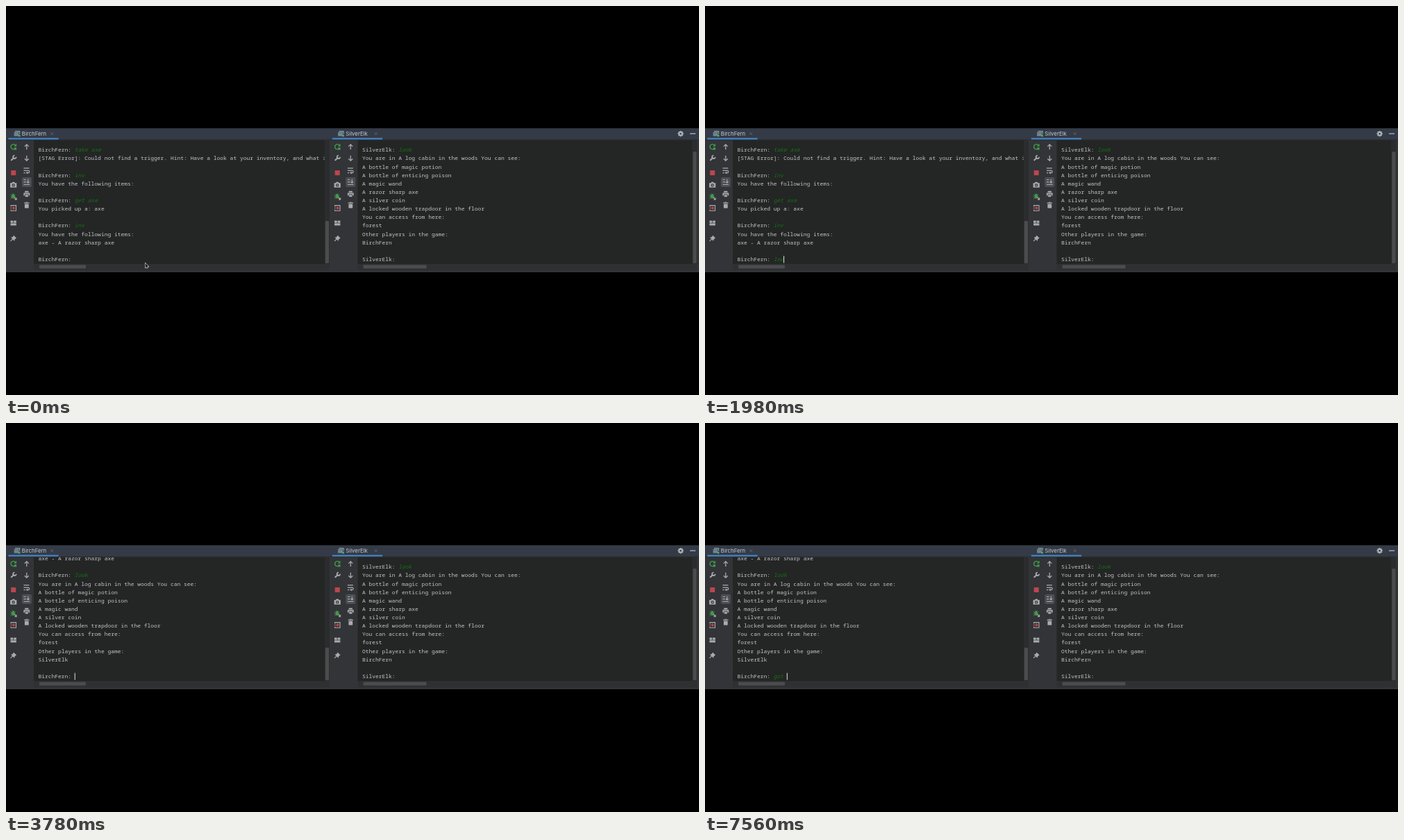
These frames come from a looping animation (998 by 561 pixels, 8 s). An HTML page with a canvas:

```html
<!DOCTYPE html>
<html lang="en">
<head>
<meta charset="utf-8">
<title>Two consoles</title>
<style>
html, body { margin: 0; width: 100%; height: 100%; overflow: hidden; background: #000; }
canvas { display: block; }
</style>
</head>
<body>
<canvas id="stage" width="998" height="561"></canvas>
<script>
const ctx = document.getElementById('stage').getContext('2d');
const LOOP = 8000;
const CHAR = 4.764, LINE = 12.13, BASE = 368, TEXT_X = 46.4, SHIFT = 466.5;
const MONO = '500 7.94px "Noto Sans Mono", "DejaVu Sans Mono", monospace';
const GREY = '#a9abad', GREEN = '#439a4c', RED = '#bd464d', INPUT = '#127412';
const HEADER = '#343b47', GUTTER = '#323437', SCREEN = '#242525';
const ONE = 'BirchFern', TWO = 'SilverElk';

// A "|" separates the prompt from what the player typed.
const room = (axe, other) => [
  'You are in A log cabin in the woods You can see:',
  'A bottle of magic potion', 'A bottle of enticing poison', 'A magic wand',
  ...(axe ? ['A razor sharp axe'] : []),
  'A silver coin', 'A locked wooden trapdoor in the floor',
  'You can access from here:', 'forest', 'Other players in the game:', other, ''
];
const history = [
  ONE + ': |take axe',
  '[STAG Error]: Could not find a trigger. Hint: Have a look at your inventory, and what items',
  '', ONE + ': |inv', 'You have the following items:',
  '', ONE + ': |get axe', 'You picked up a: axe',
  '', ONE + ': |inv', 'You have the following items:', 'axe - A razor sharp axe', ''
];
const rightLog = [TWO + ': |look', ...room(true, ONE), TWO + ': '];

const ENTER = 2800, REPLY = 3640;
const typeLook = [1460, 1680, 1940, 2520];
const typeGot = [6200, 6730, 6920, 7440];
const caretOff = [[0, 790], [1270, 1460], [4200, 4620], [5640, 6200]];

const typed = (word, times, t) => word.slice(0, times.filter(at => t >= at).length);

function leftLog(t) {
  if (t < ENTER) return [...history, ONE + ': |' + typed('look', typeLook, t)];
  const sent = [...history, ONE + ': |look'];
  if (t < REPLY) return [...sent, ''];
  return [...sent, ...room(false, TWO), ONE + ': |' + typed('got ', typeGot, t)];
}

function rect(color, x, y, w, h, r = 0) {
  ctx.fillStyle = color;
  ctx.beginPath();
  ctx.roundRect(x, y, w, h, r);
  ctx.fill();
}

function stroke(color, d, width = 1.2) {
  ctx.strokeStyle = color;
  ctx.lineWidth = width;
  ctx.stroke(new Path2D(d));
}

function fill(color, d) {
  ctx.fillStyle = color;
  ctx.fill(new Path2D(d), 'evenodd');
}

function at(x, y, draw) {
  ctx.save();
  ctx.translate(x, y);
  draw();
  ctx.restore();
}

function label(text, x, y, font, color) {
  ctx.font = font;
  ctx.fillStyle = color;
  ctx.fillText(text, x, y);
}

const icons = [
  [10.7, 203, () => {
    stroke(GREEN, 'M2.5 -2.6A3.6 3.6 0 1 0 3.2 1.7', 1.4);
    fill(GREEN, 'M4.4 -4.4V-.4H.4Z');
    rect(GREEN, 1.2, 1.2, 3.2, 3.2);
  }],
  [10.7, 219.3, () => {
    stroke(GREY, 'M-3.4 3.5L1 -.9', 2);
    stroke(GREY, 'M1.8 -3.8A2.3 2.3 0 1 0 4 -1.6', 1.7);
  }],
  [10.7, 240.6, () => rect(RED, -3.5, -3.5, 7, 7)],
  [10.7, 258, () => {
    fill(GREY, 'M-4.6 -2.8H-2.2L-1.3 -4.2H1.3L2.2 -2.8H4.6V3.8H-4.6Z' +
      'M-2.2 .4A2.2 2.2 0 1 0 2.2 .4A2.2 2.2 0 1 0 -2.2 .4Z');
    fill(GREY, 'M-1 .4A1 1 0 1 0 1 .4A1 1 0 1 0 -1 .4Z');
  }],
  [10.7, 274.7, () => {
    fill(GREEN, 'M-2.6 -.2A2.2 3.2 0 1 0 1.8 -.2A2.2 3.2 0 1 0 -2.6 -.2Z');
    stroke(GREEN, 'M-4.4 -2.6L3.6 2M-4.6 .4H3M-4.2 3.4L3.2 -2.4M-2 -4.4L0 -2.6L1.6 -4.4', .8);
    stroke(GREY, 'M1.2 1.2L4.4 4.4M4.4 1.8V4.4H1.8', 1.1);
  }],
  [10.7, 291.4, () => {
    stroke(GREY, 'M-1 -3.8H3.8V3.8H-3.6V2M-3.6 -2V-3.8H-1', 1.1);
    stroke(RED, 'M-4.6 0H1.6M-.6 -2.2L1.8 0L-.6 2.2', 1.4);
  }],
  [10.7, 313, () => {
    rect(GREY, -4.2, -3.4, 3.8, 3.1);
    rect(GREY, .4, -3.4, 3.8, 3.1);
    rect(GREY, -4.2, .4, 8.4, 3.1);
  }],
  [10.7, 335, () => {
    fill(GREY, 'M.4 -4.2L4.4 -.2L3.2 .4L1.8 1.8L1.4 4L-3.8 -1.2L-1.6 -1.6L-.2 -3Z');
    stroke(GREY, 'M-1 1L-4.2 4.2', 1.1);
  }],
  [29.8, 203, () => stroke(GREY, 'M0 4V-3.2M-3 -.4L0 -3.4L3 -.4', 1.3)],
  [29.8, 219.8, () => stroke(GREY, 'M0 -4V3.2M-3 .4L0 3.4L3 .4', 1.3)],
  [29.8, 237.3, () => {
    stroke(GREY, 'M-4.4 -3.4H3.6M-4.4 0H2.6A1.7 1.7 0 0 1 2.6 3.3H.4M-4.4 3.3H-2', 1.2);
    fill(GREY, 'M-1.2 3.3L1.4 1.2V5.2Z');
  }],
  [29.8, 253.9, () => {
    rect('#4b4f53', -7, -7, 14, 14, 2);
    stroke(GREY, 'M-4.2 3.6H4.2M-4.2 -3.4H-1M-4.2 0H-1M2 -4.2V1M.2 -.6L2 1.3L3.8 -.6', 1.1);
  }],
  [29.8, 271, () => {
    rect(GREY, -2.6, -4.2, 5.2, 2);
    fill(GREY, 'M-4.4 -1.6H4.4V2.4H2.8V.6H-2.8V2.4H-4.4Z');
    rect(GREY, -2.1, 1.4, 4.2, 2.8);
  }],
  [29.8, 287.3, () => {
    rect(GREY, -3.7, -3.9, 7.4, 1.3);
    rect(GREY, -1.2, -4.7, 2.4, 1);
    rect(GREY, -2.9, -1.9, 5.8, 6.2, .6);
  }]
];

function tab(name) {
  rect('#4583c4', 3.4, 190.3, 72.2, 2.1);
  at(16, 184, () => {
    fill('#7d98a4', 'M-3 -4H4.2V.8H3V-2.6H-3Z');
    rect('#8fa3ad', -4.4, -1.8, 6.8, 1.3);
    rect('#6d8793', -4.4, 0, 6.8, 3.6);
    rect('#4fb05a', 1.6, 1.5, 3, 3, 1.5);
  });
  label(name, 22.8, 187, '7.8px Inter, "Liberation Sans", sans-serif', '#c6c9cd');
  stroke('#666c74', 'M64.3 182.3L68.1 186.1M68.1 182.3L64.3 186.1', .8);
}

function consoleText(lines, right) {
  ctx.save();
  ctx.beginPath();
  ctx.rect(40, 193.5, right - 40.6, 178);
  ctx.clip();
  const last = lines.length - 1;
  lines.forEach((line, i) => {
    const y = BASE - (last - i) * LINE;
    if (y < 190) return;
    const [out, cmd] = line.split('|');
    label(out, TEXT_X, y, MONO, '#c2c4c6');
    if (cmd) label(cmd, TEXT_X + out.length * CHAR, y, 'italic ' + MONO, INPUT);
  });
  ctx.restore();
}

// right: where the text stops; thumb: top of the vertical scroll thumb
function panel(name, lines, right, thumb, barWidth) {
  rect(SCREEN, 40, 193.4, right - 40, 178.6);
  rect('#2b2c2d', right, 193.4, 7, 178.6);
  rect('#2f3032', 40, 372, right - 33, 9);
  rect('#4b4c4d', right + .8, thumb, 5.2, 371 - thumb, 1);
  rect('#4b4c4d', 48, 373.6, barWidth, 5, 1);
  tab(name);
  icons.forEach(([x, y, draw]) => at(x, y, draw));
  consoleText(lines, right);
}

function headerTools() {
  at(971.6, 184.2, () => {
    for (let i = 0; i < 4; i++) {
      stroke('#b3b6b9', 'M0 -4.2V4.2', 1.7);
      ctx.rotate(Math.PI / 4);
    }
    fill('#b3b6b9', 'M-3.1 0A3.1 3.1 0 1 0 3.1 0A3.1 3.1 0 1 0 -3.1 0Z');
    rect(HEADER, -1.3, -1.3, 2.6, 2.6, 1.3);
  });
  rect('#b3b6b9', 985, 183.5, 8, 1.3);
}

function pointer(t) {
  if (t >= typeLook[0]) return;
  const p = Math.min(1, Math.max(0, (t - 20) / 740));
  const k = p * p * (3 - 2 * p);
  at(202 - 12.7 * k, 374.5 - 12 * k, () => {
    if (k < .2) {
      const d = 'M-1.3 -3.6V2.8L.2 1.5L1.1 3.5L2.1 3L1.2 1.1H3.1Z';
      stroke('#d8d8d8', d, 1.2);
      fill('#161616', d);
    } else {
      stroke('#cfcfcf', 'M-1.7 -3.7Q0 -3.7 0 -2.6V2.6Q0 3.7 -1.7 3.7M1.7 -3.7Q0 -3.7 0 -2.6M0 2.6Q0 3.7 1.7 3.7', 1);
    }
  });
}

function caret(lines, t) {
  if (caretOff.some(([a, b]) => t >= a && t < b)) return;
  const width = lines[lines.length - 1].replace('|', '').length * CHAR;
  rect('#d0d0d0', TEXT_X + width - .1, 360.4, 1.1, 10.2);
}

function draw(t) {
  const lines = leftLog(t);
  const thumb = t < ENTER ? 310 : t < REPLY ? 311 : 324;
  rect('#000', 0, 0, 998, 561);
  rect(GUTTER, 0, 176.6, 998, 207.4);
  rect(HEADER, 0, 176.6, 998, 16.2);
  rect('#2a2d31', 0, 192.4, 998, 1);
  panel(ONE, lines, 459, thumb, 67);
  at(SHIFT, 0, () => panel(TWO, rightLog, 522, 210, 91));
  headerTools();
  caret(lines, t);
  pointer(t);
}

const start = performance.now();
function tick() {
  draw((performance.now() - start) % LOOP);
  requestAnimationFrame(tick);
}
tick();
</script>
</body>
</html>
```
